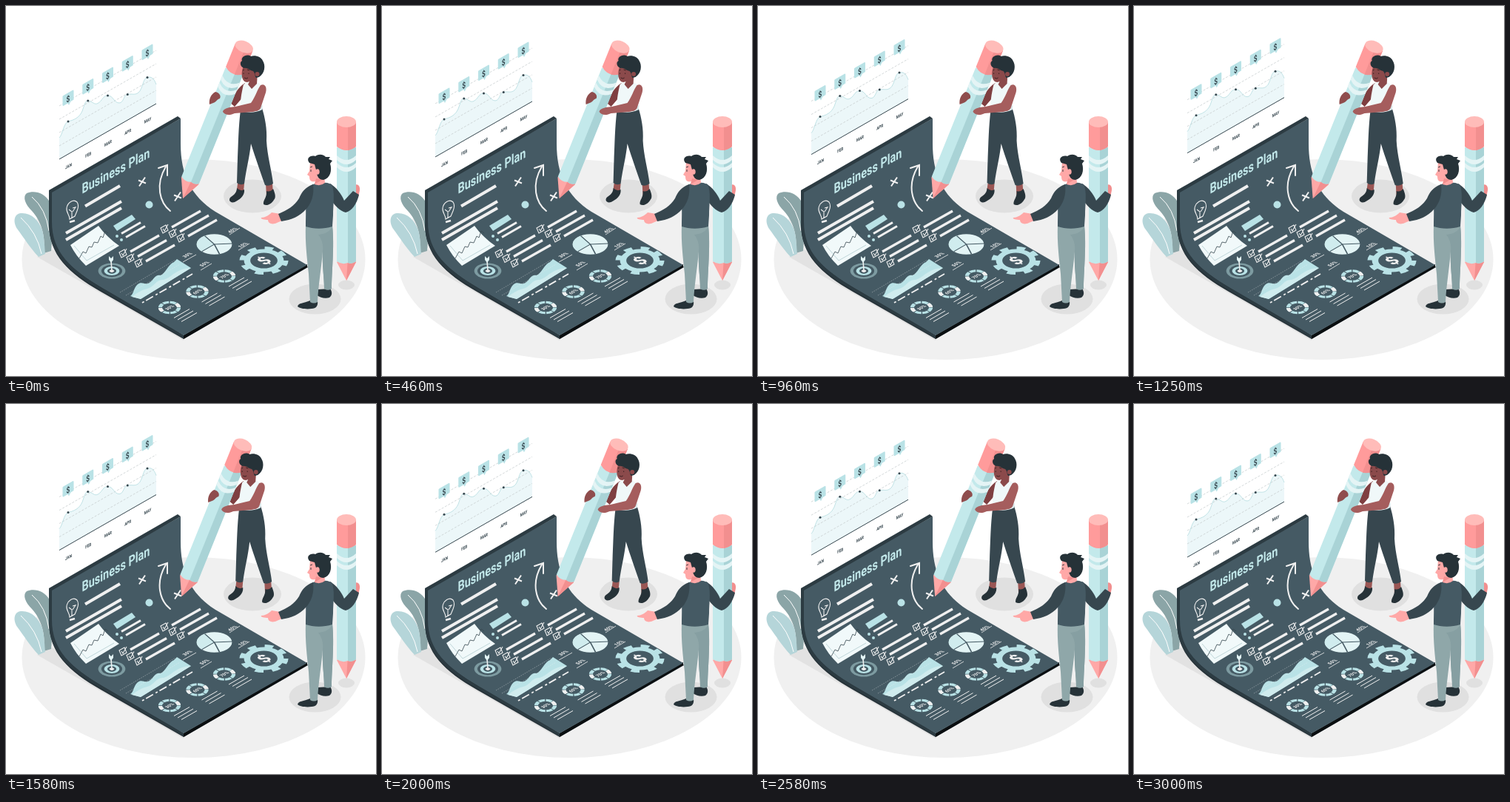
An HTML page for the animation above (3.04 s loop, 500 px wide and 500 px high).

```html
<!DOCTYPE html>
<html lang="en">
<head>
<meta charset="utf-8">
<title>Business Plan</title>
<style>
html, body { margin: 0; width: 100%; height: 100%; overflow: hidden; background: #fff; }
svg { display: block; width: 100vw; height: 100vh; }
text { font-family: Roboto, "Liberation Sans", sans-serif; text-anchor: middle; }
.line { fill: none; stroke: #f0f0f0; }
</style>
</head>
<body>
<svg viewBox="0 0 500 500">
  <defs>
    <g id="pencil">
      <path d="M-13-25L0 0 13-25 6-30H-6Z" fill="#ffa8a7"/>
      <path d="M2-30L0 0 13-25 9-30Z" fill="#f28f8f"/>
      <path d="M-13-180V-26Q-6-21 2-24 8-22 13-26V-180Z" fill="#c3e9eb"/>
      <path d="M2-180V-24Q8-22 13-26V-180Z" fill="#a9d3d6"/>
      <path d="M-13-169Q0-157 13-169V-163Q0-151-13-163ZM-13-159Q0-147 13-159V-153Q0-141-13-153Z" fill="#e4f4f5"/>
      <path d="M-13-214V-181Q0-171 13-181V-214Z" fill="#ff9b9b"/>
      <path d="M2-212V-176Q8-177 13-181V-214Z" fill="#f28f8f"/>
      <ellipse cy="-214.500" rx="13" ry="7.500" fill="#ffbcb9"/>
    </g>
  </defs>

  <ellipse cx="253.500" cy="342.500" rx="232" ry="135.500" fill="#f0f0f0"/>
  <path d="M42 339L62 329 110 350 245 440 240 452Z" fill="#e2e2e2"/>
  <g fill="#e0e0e0">
    <ellipse cx="333" cy="257" rx="39" ry="22.500"/>
    <ellipse cx="417.500" cy="396" rx="35" ry="20.500"/>
    <ellipse cx="460" cy="377" rx="11" ry="6.500"/>
  </g>

  <g id="leaves">
    <path d="M61 331C63 312 62 290 59 265 52 252 38 249 28 253 22 258 26 268 35 277 47 290 54 310 51 334Z" fill="#8ba5a7"/>
    <path d="M44 339C32 326 24 313 15 301 9 291 11 281 20 280 34 279 44 289 49 303 52 314 52 324 53 335Z" fill="#b5d5d9"/>
    <path d="M35 258Q54 274 58 304M20 286Q42 306 48 335" fill="none" stroke="#fff" stroke-width="1"/>
  </g>

  <g id="sheet">
    <path d="M58 249L63 254V293C66 335 120 365 240 445L406 350 408 353 240 450 128 386C85 361 58 337 58 294Z" fill="#263238"/>
    <path d="M240 445L407 349V353L240 450Z" fill="#0b0f11"/>
    <path d="M61 250L236 152V186C236 228 250 257 283 278L407 350 240 445 130 381C88 356 61 333 61 292Z" fill="#455a64"/>
    <path d="M58 249L232 149 236 152 62 252V292C62 333 88 356 131 382L240 445V449L128 384C86 359 58 336 58 294Z" fill="#2c3b42"/>
  </g>
  <g id="notes"></g>
  <g id="chart"></g>

  <g id="writer">
    <path d="M323 104C314 109 308 121 302 130L309 136 322 121Z" fill="#7f3f41"/>
    <use href="#pencil" transform="translate(239 260) rotate(22) scale(.98 1.030)"/>
    <path d="M275 133C274 126 277 119 283 116 288 117 291 121 289 125 285 126 284 130 280 131Z" fill="#8f4d4d"/>
    <path d="M313 240H322L321 251 311 256ZM351 240H360L361 254 352 257Z" fill="#9a5654"/>
    <path d="M312 246Q317 251 322 248C323 257 315 262 309 265 302 267 300 261 304 258 309 255 312 251 312 246ZM352 250Q357 252 361 247C364 254 365 259 362 262 359 267 353 271 348 268 347 262 353 259 352 250Z" fill="#263238"/>
    <path d="M317 140C314 165 314 185 313 205L312 239Q317 243 322 240C325 218 329 205 331 186 337 205 344 225 350 242Q356 244 361 240C359 222 353 202 352 182 353 166 350 151 346 138Z" fill="#37474f"/>
    <path d="M321 106C328 101 338 101 344 106L349 112C347 123 345 132 346 140 337 145 326 144 317 142 316 131 318 118 321 106Z" fill="#f0f8f9"/>
    <path d="M317 142Q330 145 346 140L347 134Q335 140 317 138Z" fill="#dcebed"/>
    <path d="M321 81C317 90 318 103 326 103L329 102 327 106 332 112 339 105 340 90 336 78Z" fill="#8b4a4b"/>
    <path d="M344 107C350 104 353 110 351 117L344 138C342 142 338 142 333 143L309 145C303 148 296 148 293 143 293 140 298 138 302 137L310 136 331 131C337 123 339 114 344 107Z" fill="#a55d5d"/>
    <path d="M322 84C317 83 315 76 319 74 317 69 325 64 331 68 337 66 345 69 347 74 351 80 350 91 342 96L338 97C336 95 337 91 334 88 329 87 326 83 322 84Z" fill="#263238"/>
    <circle cx="339.500" cy="92" r="3" fill="#8b4a4b"/>
    <path d="M321 90.500V92M328 90.500V92M320 87L322 86M326 86L329 87M322 97Q325 99 327 97" fill="none" stroke="#2b1718" stroke-width=".8"/>
  </g>

  <g id="pointer">
    <path d="M468 246C472 238 479 241 478 249L476 259H467Z" fill="#f28f8f"/>
    <use href="#pencil" transform="translate(460 371)"/>
    <path d="M421 383L438 382C441 386 441 391 437 394 431 396 424 394 419 390Z" fill="#263238"/>
    <path d="M411 398L421 399C422 405 419 409 413 409 406 410 397 409 394 406 395 401 402 402 411 398Z" fill="#263238"/>
    <path d="M405 296C404 320 407 342 409 362L411 400Q416 403 421 400C422 378 426 355 428 332 427 351 430 366 430 382Q435 385 440 382C440 361 444 325 441 296Z" fill="#8fa7a9"/>
    <path d="M441 298C437 306 430 308 422 309 427 315 429 324 428 332 427 351 430 366 430 382Q435 385 440 382C440 361 444 325 441 298Z" fill="#869fa2"/>
    <path d="M371 281L359 279C355 283 350 286 345 286 343 288 350 289 354 289 354 294 360 296 366 293L373 290Z" fill="#ffa8a7"/>
    <path d="M438 240C446 245 453 253 457 263L469 250 477 255C474 268 467 277 459 279 451 277 444 269 440 263Z" fill="#37474f"/>
    <path d="M413 242C420 238 432 237 440 241 445 251 442 268 442 283L441 298C428 302 414 301 405 298 405 285 406 270 404 262Z" fill="#455a64"/>
    <path d="M415 241C404 245 400 251 396 260 390 270 380 276 368 281L372 291C386 289 397 284 405 275 412 268 417 256 415 241Z" fill="#37474f"/>
    <path d="M411 211L410 223 407 228 410 230C410 236 412 238 418 237L417 241Q425 244 431 239L430 227 420 214Z" fill="#ffa8a7"/>
    <path d="M419 233L418 237 417 241 427 235Z" fill="#f28f8f"/>
    <path d="M410 212C405 206 411 201 418 203 423 199 430 201 432 204L438 204 436 207 441 209 438 213C441 222 438 233 429 235 423 235 420 230 420 225L417 214Z" fill="#263238"/>
    <ellipse cx="421" cy="224" rx="2.700" ry="3.800" fill="#ffa8a7"/>
    <path d="M412 221V224M411 218L414 217" stroke="#263238" stroke-width=".9"/>
  </g>
</svg>

<script>
const byId = id => document.getElementById(id);
const WHITE = '#f0f0f0', PALE = '#e3f4f5', SOFT = '#d0ecee', BLUE = '#b9e2e6', SLATE = '#455a64', INK = '#37474f';

const path = (d, attrs) => `<path d="${d}" ${attrs}/>`;
const line = (d, width = 1, extra = '') => path(d, `class="line" stroke-width="${width}" ${extra}`);

// Upright plane for text on the wall side, lying plane for the floor side.
const wallText = (x, y, size, fill, text, anchor = 'middle') =>
  `<text transform="matrix(.76 -.41 0 1 ${x} ${y})" font-size="${size}" fill="${fill}" font-weight="700" style="text-anchor:${anchor}">${text}</text>`;
const onFloor = (x, y, content) => `<g transform="matrix(.866 -.5 .866 .5 ${x} ${y})">${content}</g>`;
const floorText = (x, y, size, text) =>
  onFloor(x, y, `<text y="${size * .36}" font-size="${size}" fill="${WHITE}" font-weight="700">${text}</text>`);
const ring = (r, color, width, dash = '') =>
  `<circle r="${r}" fill="none" stroke="${color}" stroke-width="${width}" stroke-dasharray="${dash}"/>`;
const disc = (r, color) => `<circle r="${r}" fill="${color}"/>`;

const cross = (x, y) => `M${x - 5} ${y - 2}l10 4M${x + 4} ${y - 6}l-8 12`;

function checkItem(x, y) {
  return line(`M${x - 5} ${y - 2}l7 -4 3 7 -7 4zM${x - 2} ${y - 1}l2 3 5 -9`, 1.1) +
    line(`M${x + 10} ${y - 3}l39 -22`, 3.300);
}

function donut(x, y, label) {
  const step = 2 * Math.PI * 10.300 / 8;
  const rows = [0, 1, 2].map(i => `M${x + 6 + i * 5} ${y + 14 + i * 2.500}l21 -12`).join('');
  return onFloor(x, y, ring(10.300, BLUE, 4.200, `${step - 1} 1`) + ring(10.300, WHITE, 4.200, `${step - 1} ${step * 3 + 1}`)) +
    floorText(x, y, 6.200, label) + line(rows, 1);
}

function gear(x, y) {
  const tooth = 2 * Math.PI * 24 / 16;
  return onFloor(x, y, ring(18.500, BLUE, 7) + ring(24, BLUE, 6, `${tooth} ${tooth}`) +
    `<text y="7.500" font-size="21" font-weight="900" fill="${WHITE}">$</text>`);
}

function drawNotes() {
  const title = wallText(102.500, 254, 19, '#c3e9eb', 'Business Plan', 'start');
  const marks = line(cross(184, 237.500) + cross(232, 257.500), 2) +
    line('M222 277C208 266 201 242 216 217M206 219l12 -4 0 14', 2, 'stroke-linecap="round"') +
    `<circle cx="193.500" cy="268.500" r="5" fill="${BLUE}"/>`;
  const bulb = line('M86 288C86 282 81 279 82 273 83 266 91 260 96 265 100 271 95 279 93 284ZM89 286l0 -8 -4 -3M90 278l4 -6 -4 1', 1.100) +
    line('M86 292l7 -2', 2.500);
  const headings = line('M107 270.500L154 243M81 307L156 264M81 316L156 273', 4);
  const card = path('M87 323L125 297C133 308 143 317 153 324L108 351C99 342 92 333 87 323Z', 'fill="#f1f9fa"') +
    path('M99 341l5 -9 4 2 4 -9 4 1 3 -7 5 1 4 -9 3 2 3 -9 4 3', `fill="none" stroke="${INK}" stroke-width=".8"`) +
    path('M92 324L109 344 146 323', 'fill="none" stroke="#a9c6ca" stroke-width=".7"');
  const target = onFloor(143, 358, disc(15, '#7d9ba1') + disc(11.500, SLATE) + disc(8.500, BLUE) + disc(5, SLATE) + disc(2.500, WHITE)) +
    line('M143 358L142 344', 1.600) + path('M139 338l3 3 3 -3v5l-3 4 -3 -4z', `fill="${PALE}"`);
  const aside = path('M145 297L170 282 175 288 150 304Z', `fill="${BLUE}"`) +
    `<circle cx="150" cy="311" r="2" fill="${BLUE}"/><circle cx="156" cy="316" r="2" fill="${BLUE}"/>` +
    line('M156 307.500L182 292.500M162 312.500L188 297.500', 3);
  const checks = [[158, 335], [168, 341.500], [179, 348], [214, 302], [225, 308], [236, 314]]
    .map(p => checkItem(...p)).join('');
  const area = path('M168 392C173 389 172 381 178 376 185 371 188 379 195 373 200 369 202 362 209 364 216 361 219 349 227 346L231 342 250 354 182 396Z', `fill="${BLUE}"`) +
    path('M170 393C180 386 183 384 191 382 201 379 203 369 213 370 224 367 229 355 250 354L182 396Z', `fill="${SOFT}"`) +
    line('M154 387L229 343M162 391L235 349', .6, 'stroke-dasharray="1.500 1.500" opacity=".65"') +
    line('M184 401L252 362', 1.800, 'stroke-dasharray="3 3 11 4"');
  const pie = onFloor(281.500, 322, disc(19.500, PALE) + path('M0 0L-19.500 0A19.500 19.500 0 0 1 4 -19Z', `fill="${SOFT}"`) +
    path('M0 0L-19.500 0M0 0L4 -19M0 0L15 13M0 0L-9 17', `stroke="${SLATE}" stroke-width="1.300"`));
  const shares = floorText(245, 336.500, 6.500, '30%') + floorText(268, 348.500, 6.500, '50%') +
    floorText(306, 303, 6.500, '40%') + floorText(320, 323, 6.500, '10%') +
    line('M239 346l18 -10M263 357l15 -9M302 309l14 -9M314 330l15 -9', .8);
  const donuts = donut(221, 407.500, '30%') + donut(258.500, 386, '60%') + donut(295, 365, '70%');

  byId('notes').innerHTML = title + marks + bulb + headings + card + target + aside + checks +
    area + pie + shares + gear(348.500, 344) + donuts;
}

function drawChart() {
  const months = ['JAN', 'FEB', 'MAR', 'APR', 'MAY'];
  const values = [156, 128, 121, 119.500, 96.500];
  const curve = 'M72 178C76 175 78 158 84 156 92 154 99 151 103 142 106 134 107 128 110.500 128 117 128 119 135 125 131 130 128 131 121 137.500 121 145 121 146 131 153 131 159 131 159 120 164 119.500 170 118 174 121 179 117 185 112 185 97 191 96.500 197 95 200 98 203 106';
  let markup = path(curve + 'V132L72 207Z', 'fill="#e8f6f8" opacity=".8"');
  for (let i = 1; i <= 4; i++) {
    markup += path(`M72 ${207 - 18 * i}L203 ${132 - 18 * i}`, 'stroke="#c8ced0" stroke-width=".8" stroke-dasharray="3 2"');
  }
  markup += path(curve, 'fill="none" stroke="#b4dce0" stroke-width=".8"') +
    path('M72 207L203 132', `stroke="${INK}" stroke-width="1"`);
  months.forEach((month, i) => {
    const x = 84 + 26.750 * i, y = 125.500 - 15.500 * i;
    markup += path(`M${x - 6.500} ${y - 4.500}l13 -7.500q1 0 1 1v12l-4 2.500 -2.500 5 -1.500 -2.500 -6 3.500q-1 0 -1 -1v-12z`, `fill="${BLUE}"`) +
      wallText(x, y + 4, 11, INK, '$') +
      wallText(x + .5, 218.500 - 15.500 * i, 6, INK, month) +
      `<circle cx="${x}" cy="${values[i]}" r="1.500" fill="${INK}"/>`;
  });
  byId('chart').innerHTML = markup;
}

const LOOP = 3040, CYCLE = 3000, FPS = 24;
const SHAKE = [0, -1, 2, -4, 4, -4, 4, -4, 2, -1, 0];

function shakeAt(phase) {
  const pos = phase * 10, i = Math.min(Math.floor(pos), 9);
  return SHAKE[i] + (SHAKE[i + 1] - SHAKE[i]) * (pos - i);
}

function render(ms) {
  const frame = Math.floor((ms % LOOP + 5) * FPS / 1000);
  const phase = Math.min(frame / FPS * 1000 / CYCLE, 1);
  const lift = -10 * (1 - Math.abs(2 * phase - 1));
  byId('chart').setAttribute('transform', `translate(0 ${lift})`);
  byId('writer').setAttribute('transform', `translate(${shakeAt(phase)} 0)`);
}

drawNotes();
drawChart();
const start = performance.now();
function tick() {
  render(performance.now() - start);
  requestAnimationFrame(tick);
}
render(0);
requestAnimationFrame(tick);
</script>
</body>
</html>
```
